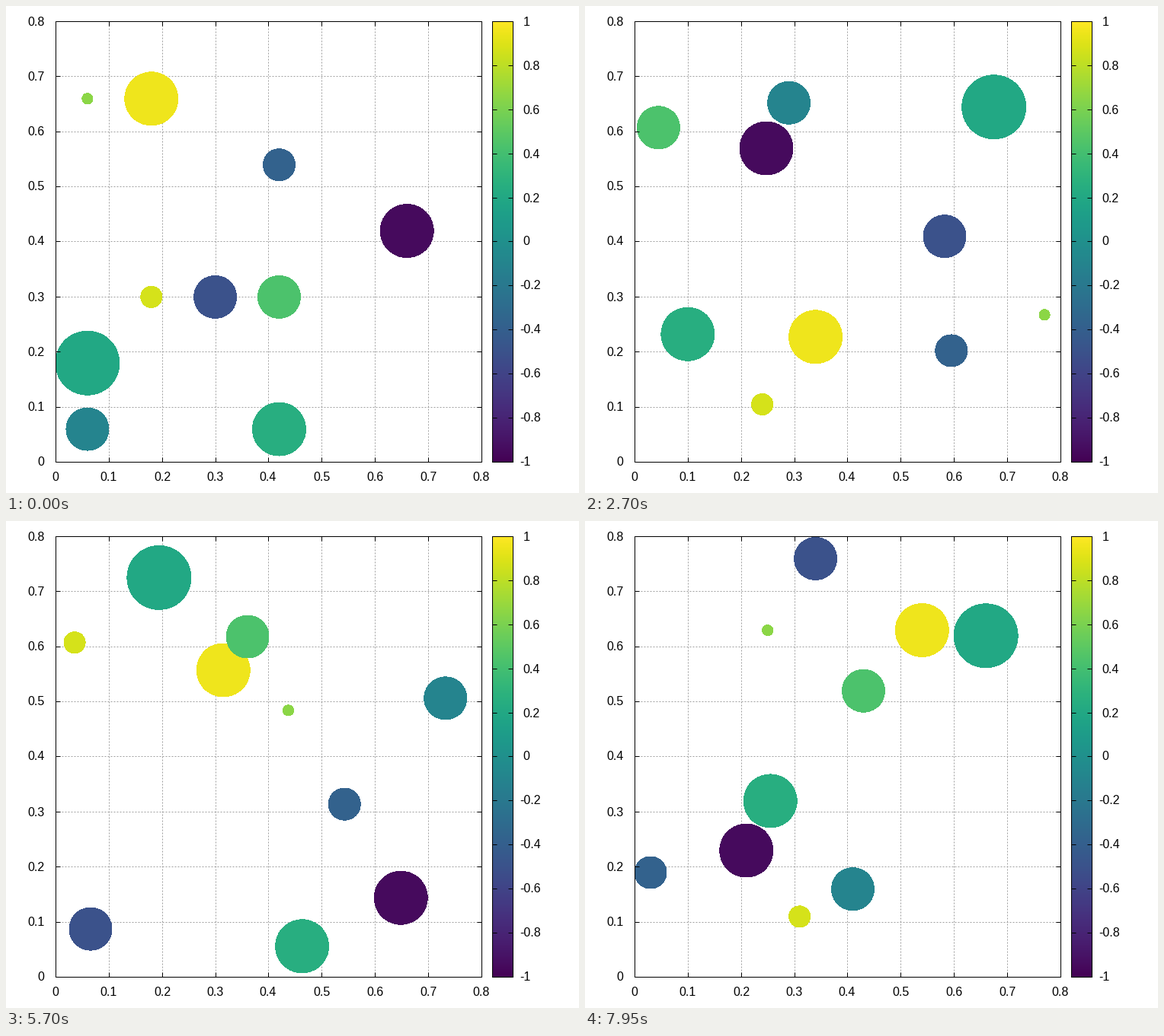
Animation of 752x640 px, one loop 8000 ms. Source, as a matplotlib script:

```python
import itertools
import math

import matplotlib.pyplot as plt
import numpy as np
from matplotlib.animation import FuncAnimation
from matplotlib.patches import Circle, Rectangle

WIDTH, HEIGHT, DPI = 752, 640, 100
LEFT, RIGHT, TOP, BOTTOM = 65, 624, 20, 599
BAR_LEFT, BAR_RIGHT = 638, 665
SIZE = 0.8
X_SCALE = (RIGHT - LEFT) / SIZE
Y_SCALE = (BOTTOM - TOP) / SIZE
PX = 72 / DPI
TICK = 6

HOLD = 3  # animation frames per simulation step
FRAMES, INTERVAL = 160, 50
MIDDLE, LAST = 24, 53  # steps of the second and third key pose
SPEED = 0.05  # distance per step
CELL = 0.12  # spacing of the starting lattice

# radius, colour level, starting cell, middle pose, last pose
BALLS = [
    (.06, .20, (0, 1), (.60, .60), (.66, .62)),
    (.05, .95, (1, 5), (.48, .49), (.54, .63)),
    (.05, -.95, (5, 3), (.05, .40), (.21, .23)),
    (.05, .25, (3, 0), (.46, .29), (.255, .32)),
    (.04, -.50, (2, 2), (.37, .62), (.34, .76)),
    (.04, .43, (3, 2), (.40, .71), (.43, .52)),
    (.04, -.10, (0, 0), (.38, .37), (.41, .16)),
    (.03, -.38, (3, 4), (.42, .43), (.03, .19)),
    (.02, .87, (1, 2), (.26, .32), (.31, .11)),
    (.01, .65, (0, 5), (.52, .05), (.25, .63)),
]


def fold(u, radius):
    """Reflect unbounded coordinates back between the walls."""
    span = SIZE - 2 * radius
    return SIZE - radius - np.abs((u - radius) % (2 * span) - span)


def mirrors(u, radius):
    """Images of a coordinate seen through the two walls."""
    period = 2 * (SIZE - 2 * radius)
    return [image + k * period for image in (u, 2 * radius - u) for k in (-1, 0, 1)]


def overlap(path, radius, laid):
    """Total depth by which a path cuts into paths already laid."""
    return sum(
        np.maximum(radius + other_radius - np.hypot(*(path - other).T), 0).sum()
        for other, other_radius in laid
    )


def bounce_path(start, end, steps, radius, laid):
    """Straight run with wall bounces that keeps its speed and avoids others."""
    t = np.linspace(0, 1, steps + 1)[:, None]
    start = np.array(start)
    best, best_cost = None, math.inf
    for goal in itertools.product(*(mirrors(u, radius) for u in end)):
        move = np.array(goal) - start
        path = fold(start + t * move, radius)
        cost = abs(np.hypot(*move) - SPEED * steps) + 5 * overlap(path, radius, laid)
        if cost < best_cost:
            best, best_cost = path, cost
    return best


def plan_tracks():
    first_half, second_half = [], []
    for radius, _, cell, middle, last in BALLS:
        start = [CELL * (index + .5) for index in cell]
        first = bounce_path(start, middle, MIDDLE, radius, first_half)
        second = bounce_path(middle, last, LAST - MIDDLE, radius, second_half)
        first_half.append((first, radius))
        second_half.append((second, radius))
    return [np.vstack([first, second[1:]])
            for (first, _), (second, _) in zip(first_half, second_half)]


fig = plt.figure(figsize=(WIDTH / DPI, HEIGHT / DPI), dpi=DPI, facecolor="white")
ax = fig.add_axes([0, 0, 1, 1])
ax.set_axis_off()
cmap = plt.get_cmap("viridis")


def line(x0, y0, x1, y1, **style):
    options = dict(color="black", lw=PX, zorder=5, solid_capstyle="butt", snap=False)
    options.update(style)
    ax.plot([x0 + .5, x1 + .5], [y0 + .5, y1 + .5], **options)


def frame_box(left, right):
    ax.add_patch(Rectangle((left + .5, TOP + .5), right - left, BOTTOM - TOP,
                           fill=False, ec="black", lw=PX, zorder=6, snap=False))


def side_ticks(left, right, y):
    line(left, y, left + TICK, y)
    line(right - TICK, y, right, y)


def label(x, y, text, align):
    ax.text(x, y + 5.5, text, ha=align, va="baseline", color="black",
            family="Liberation Sans", fontsize=16 * PX)


def pixel(value):
    return math.floor(value + .49)


def draw_plot():
    grid = dict(color="#a0a0a0", ls=(0, (2, 2)), zorder=1, dash_capstyle="butt")
    for k in range(9):
        x = pixel(LEFT + k * X_SCALE / 10)
        y = pixel(BOTTOM - k * Y_SCALE / 10)
        if 0 < k < 8:
            line(x, BOTTOM, x, TOP, **grid)
            line(LEFT, y, RIGHT, y, **grid)
        line(x, BOTTOM, x, BOTTOM - TICK)
        line(x, TOP, x, TOP + TICK)
        side_ticks(LEFT, RIGHT, y)
        label(x, 619, f"{k / 10:g}", "center")
        label(50.5, y, f"{k / 10:g}", "right")
    frame_box(LEFT, RIGHT)


def draw_color_bar():
    ax.imshow(np.linspace(1, 0, 256)[:, None], cmap=cmap, vmin=0, vmax=1,
              extent=(BAR_LEFT, BAR_RIGHT + 1, BOTTOM + 1, TOP), aspect="auto",
              interpolation="nearest", zorder=2)
    for k in range(-5, 6):
        y = pixel((TOP + BOTTOM) / 2 - k * (BOTTOM - TOP) / 10)
        side_ticks(BAR_LEFT, BAR_RIGHT, y)
        label(674 if k < 0 else 678.5, y, f"{k / 5:g}", "left")
    frame_box(BAR_LEFT, BAR_RIGHT)


draw_plot()
draw_color_bar()
ax.set_xlim(0, WIDTH)
ax.set_ylim(HEIGHT, 0)

tracks = plan_tracks()
discs = [
    ax.add_patch(Circle((0, 0), radius * X_SCALE, fc=cmap((level + 1) / 2),
                        lw=0, antialiased=False, zorder=3))
    for radius, level, *_ in BALLS
]


def update(frame):
    for disc, track in zip(discs, tracks):
        x, y = track[frame // HOLD]
        disc.center = (LEFT + x * X_SCALE, BOTTOM + .5 - y * Y_SCALE)
    return discs


animation = FuncAnimation(fig, update, frames=FRAMES, interval=INTERVAL,
                          init_func=lambda: update(0), repeat=True,
                          repeat_delay=0, blit=False)
plt.show()
```
